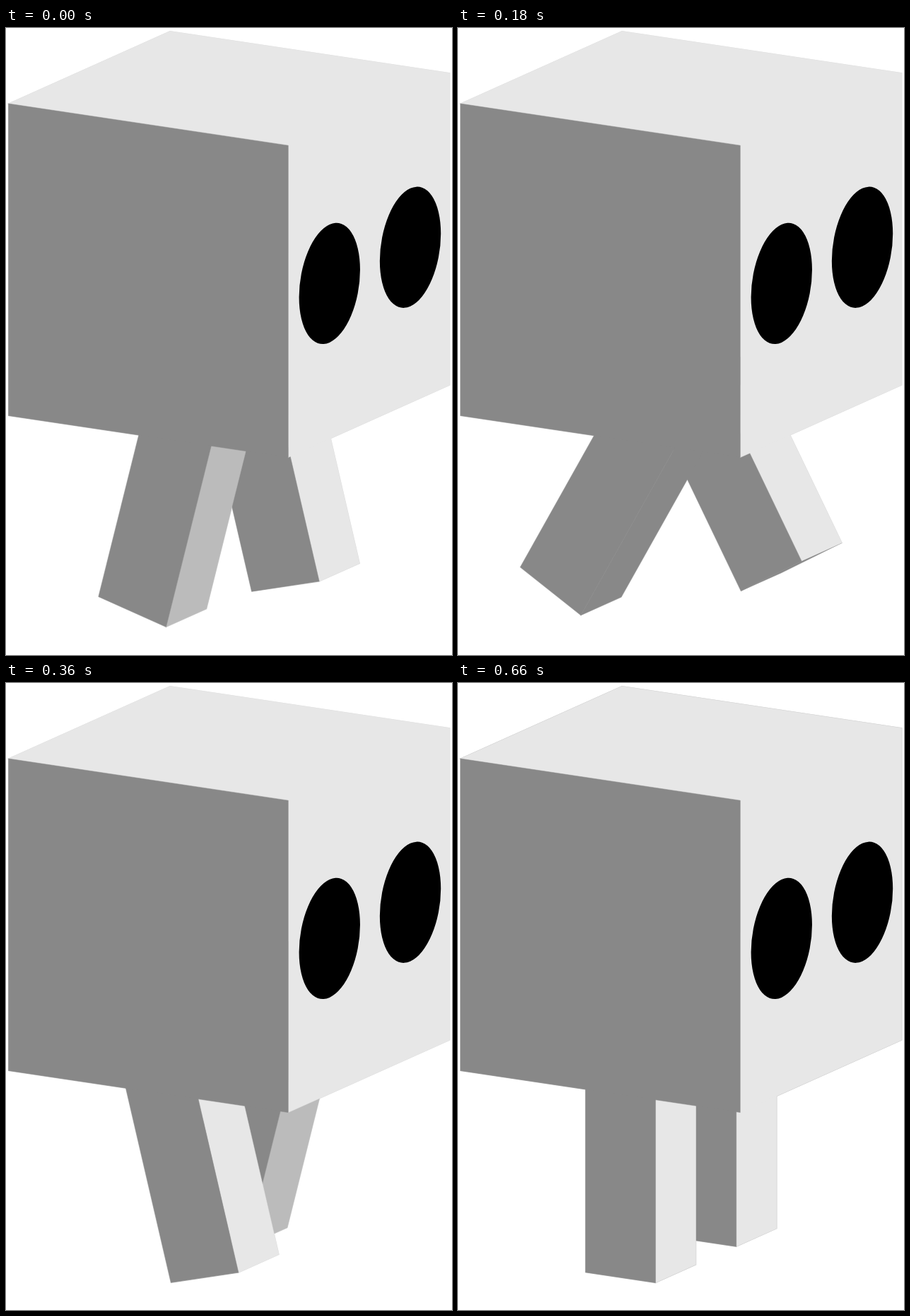
These frames come from a looping animation (631x887 px, 720 ms). An HTML page with a canvas:

```html
<!DOCTYPE html>
<html>
<head>
<meta charset="utf-8">
<style>
  html, body { margin: 0; width: 100%; height: 100%; overflow: hidden; background: #fff; }
  canvas { display: block; }
</style>
</head>
<body>
<canvas id="stage" width="631" height="887"></canvas>
<script>
const ctx = document.getElementById('stage').getContext('2d');
const LIGHT = '#e7e7e7', HALF = '#bbb', DARK = '#888';
const SCALE = 457, DEG = Math.PI / 180;
const YAW = 30 * DEG, TILT = 15 * DEG;

// Orthographic axes of the unit cube: u forward, v away from the viewer, w up.
const U = [SCALE * Math.cos(YAW), SCALE * Math.sin(YAW) * Math.sin(TILT)];
const V = [SCALE * Math.sin(YAW), -SCALE * Math.cos(YAW) * Math.sin(TILT)];
const W = -SCALE * Math.cos(TILT);
const project = ([u, v, w]) => [
  3.5 + u * U[0] + v * V[0],
  107 + u * U[1] + v * V[1] + (w - 1) * W
];

function face(color, ...points) {
  const path = new Path2D();
  points.forEach(p => path.lineTo(...project(p)));
  path.closePath();
  return { color, path };
}

const cube = [
  face(LIGHT, [0, 0, 1], [0, 1, 1], [1, 1, 1], [1, 1, 0], [1, 0, 0], [1, 0, 1]),
  face(DARK, [0, 0, 0], [0, 0, 1], [1, 0, 1], [1, 0, 0])
];

// A square bar swinging about its centre, just below the cube.
function leg(v, swing) {
  const a = swing * 15 * DEG, cos = Math.cos(a), sin = Math.sin(a);
  const back = v + 0.25, h = 0.125;
  const at = (x, y, depth) =>
    [0.5 + x * cos - y * sin, depth, -0.125 + x * sin + y * cos];
  const shade = swing >= 0 ? LIGHT : swing === -1 ? HALF : DARK;
  const faces = [
    face(shade, at(h, 0.5, v), at(h, 0.5, back), at(h, -0.5, back), at(h, -0.5, v)),
    face(DARK, at(-h, 0.5, v), at(h, 0.5, v), at(h, -0.5, v), at(-h, -0.5, v))
  ];
  if (swing >= 2) {
    faces.unshift(face(DARK, at(-h, -0.5, v), at(h, -0.5, v), at(h, -0.5, back), at(-h, -0.5, back)));
  }
  return faces;
}

function eye(v) {
  const [x, y] = project([1.0035, v, 0.5]);
  ctx.save();
  ctx.transform(V[0], V[1], 0, W, x, y);
  ctx.beginPath();
  ctx.arc(0, 0, 0.189, 0, 2 * Math.PI);
  ctx.restore();
  ctx.fillStyle = '#000';
  ctx.fill();
}

function draw(now) {
  const step = Math.floor(now / 60) % 12;
  const swing = Math.abs((step + 10) % 12 - 6) - 3;
  const faces = [...leg(0.625, swing), ...leg(0.125, -swing), ...cube];

  ctx.clearRect(0, 0, 631, 887);
  // Faint silhouette rim, a little stronger when standing straight.
  ctx.lineWidth = 1.3;
  ctx.strokeStyle = swing ? '#ddd' : '#c4c4c4';
  faces.forEach(f => ctx.stroke(f.path));

  ctx.lineWidth = 0.5;
  for (const { color, path } of faces) {
    ctx.fillStyle = ctx.strokeStyle = color;
    ctx.fill(path);
    ctx.stroke(path);
  }
  eye(0.25);
  eye(0.75);
}

function tick() {
  draw(performance.now());
  requestAnimationFrame(tick);
}
tick();
</script>
</body>
</html>
```
